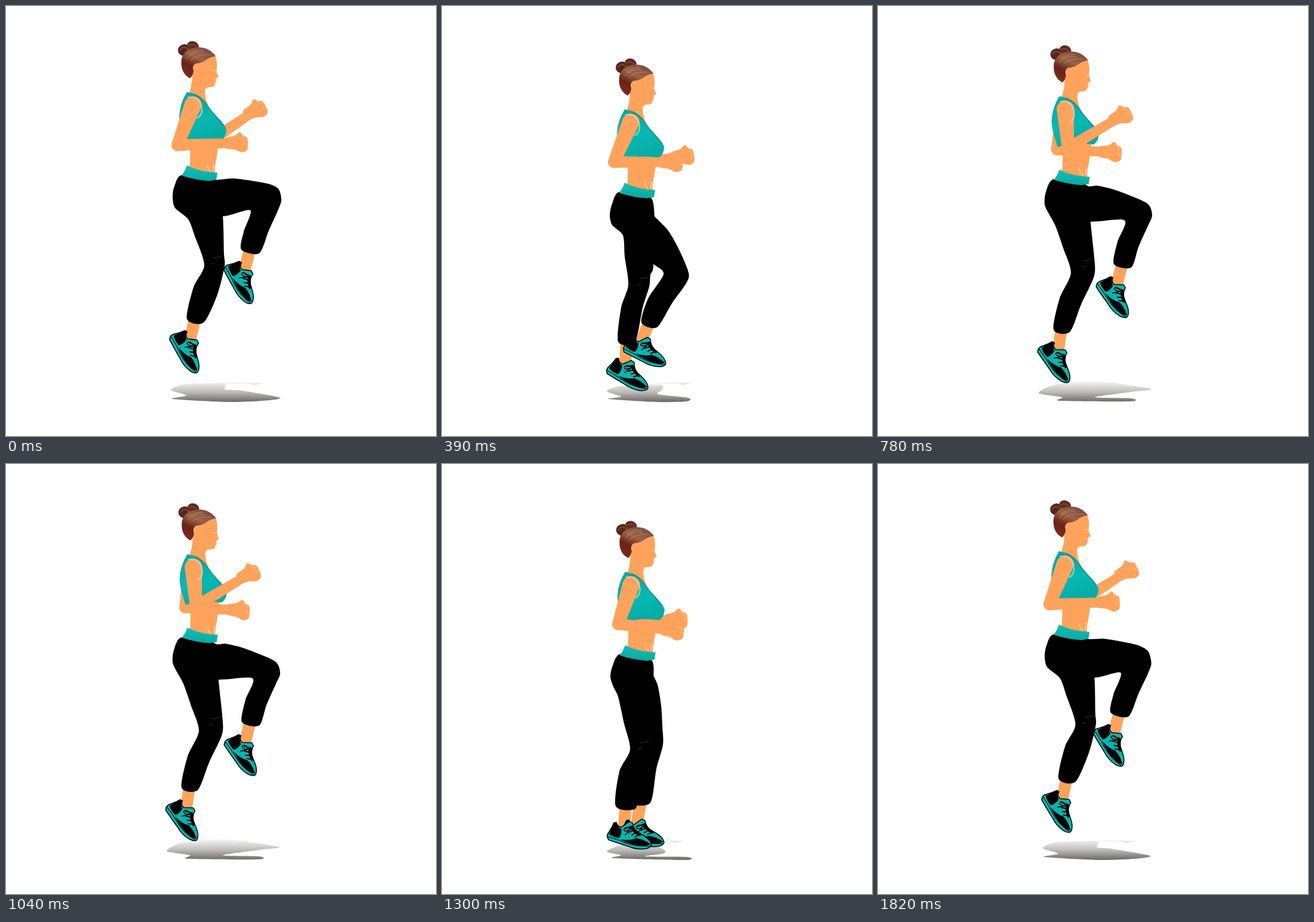
Recreate the animation shown at these times as an HTML page with a canvas. Size 720 px wide and 720 px high, loop 1950 ms.

```html
<!DOCTYPE html>
<html lang="en">
<head>
<meta charset="utf-8">
<title>High knees</title>
<style>
html, body { margin: 0; width: 100%; height: 100%; overflow: hidden; background: #fff; }
canvas { display: block; width: 100vw; height: 100vh; }
</style>
</head>
<body>
<canvas id="stage" width="720" height="720"></canvas>
<script>
const ctx = document.getElementById('stage').getContext('2d');
const SKIN = '#ffa35c', TEAL = '#06b5af', BLACK = '#000';
const STEP = 130;

// Pose: dy = body drop, near/far = elbow + hand, stand/lift = leg outlines,
// shoes = heel x, y, angle for the standing and the lifted foot.
const high = {
  dy: 0, near: [287, 233, 388, 229], far: [345, 224, 419, 174],
  stand: [295,283, 282,302, 279,320, 283,338, 305,357, 316,385, 332,434, 314,471,
    303,524, 331,530, 354,483, 366,435, 365,415, 363,352, 353,292],
  lift: [320,288, 353,291, 384,289, 436,297, 456,306, 461,325, 455,343, 440,376,
    424,414, 394,408, 398,378, 409,342, 363,352, 315,340],
  shoes: [276, 553, 55, 367, 437, 55],
  shadow: [276,643, 300,633, 365,632, 367,642, 395,644, 459,656, 430,661, 372,663, 279,658, 302,652],
  glint: 431
};
const half = {
  dy: 29, near: [288, 261, 386, 262], far: [340, 262, 405, 251],
  stand: [298,311, 285,331, 281,350, 285,367, 303,384, 306,420, 312,467, 300,505,
    295,562, 323,563, 336,505, 347,470, 349,450, 354,432, 352,324],
  lift: [322,318, 351,324, 350,345, 378,375, 398,410, 413,447, 409,464, 385,498,
    360,538, 334,530, 345,490, 371,449, 354,432, 315,400],
  shoes: [276, 610, 25, 304, 574, 21],
  shadow: [276,645, 300,636, 365,634, 369,642, 362,650, 412,656, 410,662, 360,663, 279,658, 300,654],
  glint: 418
};
const swapLow = {
  dy: 21.5, near: [310, 245, 405, 221], far: [300, 254, 391, 261],
  stand: [297,304, 283,325, 281,345, 288,362, 298,385, 308,425, 320,464, 302,500,
    292,558, 318,562, 333,515, 356,470, 358,455, 359,402, 351,316],
  lift: [322,310, 351,316, 350,328, 376,345, 400,374, 428,417, 428,433, 411,472,
    391,516, 363,510, 371,465, 390,427, 359,402, 310,370],
  shoes: [270, 601, 30, 335, 549, 42],
  shadow: [270,649, 300,634, 370,630, 427,641, 390,647, 362,655, 420,657, 418,662, 310,661, 312,655],
  glint: 405
};
const swapHigh = {
  dy: 7, near: [318, 238, 408, 184], far: [300, 240, 391, 245],
  stand: [295,290, 281,312, 279,332, 285,346, 297,368, 310,405, 323,447, 304,490,
    294,542, 321,546, 340,500, 362,452, 362,420, 356,362, 353,303],
  lift: [320,296, 353,302, 368,301, 400,309, 450,330, 459,350, 452,368, 436,404,
    424,438, 395,432, 401,395, 413,359, 356,361, 310,350],
  shoes: [269, 574, 49, 367, 465, 49],
  shadow: [269,648, 300,633, 370,629, 457,641, 425,646, 363,655, 424,657, 422,662, 305,661, 308,655],
  glint: 405
};
const low = {
  dy: 36.5, near: [295, 268, 388, 279], far: [312, 267, 394, 260],
  stand: [299,318, 285,340, 282,357, 287,373, 295,390, 305,435, 315,478, 297,515,
    291,573, 324,577, 330,540, 345,490, 350,460, 350,400, 352,330],
  lift: [322,325, 352,331, 350,345, 361,370, 367,405, 369,440, 370,470, 359,510,
    349,567, 318,567, 325,520, 330,490, 320,440, 310,400],
  shoes: [277, 624, 12, 298, 620, 12],
  shadow: [276,649, 300,638, 345,636, 372,646, 371,652, 340,657, 410,658, 408,663, 288,660, 300,655],
  glint: 404, standFront: true
};

const lerp = (a, b, k) => Array.isArray(a) ? a.map((v, i) => lerp(v, b[i], k)) : a + (b - a) * k;
function mix(a, b, k) {
  const out = {};
  for (const key in a) if (key !== 'standFront') out[key] = lerp(a[key], b[key], k);
  return out;
}

const peak = {
  ...swapHigh, dy: 0, stand: high.stand, lift: high.lift, shoes: high.shoes,
  near: lerp(swapLow.near, swapHigh.near, 1.5), far: lerp(swapLow.far, swapHigh.far, 1.5)
};
const nearTop = mix(high, half, 0.07), middle = mix(high, half, 0.5);
const steps = [high, nearTop, middle, half, low, swapLow, swapHigh, peak,
  swapHigh, swapLow, low, mix(low, half, 0.5), half, middle, nearTop];

function smooth(p, fill) {
  const n = p.length, at = i => p[(i + n) % n], t = 0.13;
  ctx.beginPath();
  ctx.moveTo(p[0], p[1]);
  for (let i = 0; i < n; i += 2) {
    ctx.bezierCurveTo(
      at(i) + (at(i + 2) - at(i - 2)) * t, at(i + 1) + (at(i + 3) - at(i - 1)) * t,
      at(i + 2) - (at(i + 4) - at(i)) * t, at(i + 3) - (at(i + 5) - at(i + 1)) * t,
      at(i + 2), at(i + 3));
  }
  ctx.closePath();
  ctx.fillStyle = fill;
  ctx.fill();
}

function disc(x, y, rx, ry, fill, turn = 0) {
  ctx.beginPath();
  ctx.ellipse(x, y, rx, ry, turn, 0, Math.PI * 2);
  ctx.fillStyle = fill;
  ctx.fill();
}

function line(d, color, width) {
  ctx.strokeStyle = color;
  ctx.lineWidth = width;
  ctx.stroke(new Path2D(d));
}

function shape(d, fill) {
  ctx.fillStyle = fill;
  ctx.fill(new Path2D(d));
}

function fade(x1, y1, x2, y2, ...colors) {
  const g = ctx.createLinearGradient(x1, y1, x2, y2);
  colors.forEach((c, i) => g.addColorStop(i / (colors.length - 1), c));
  return g;
}

function taper(x1, y1, r1, x2, y2, r2) {
  const a = Math.atan2(y2 - y1, x2 - x1) + Math.PI / 2;
  ctx.beginPath();
  ctx.arc(x1, y1, r1, a, a + Math.PI);
  ctx.arc(x2, y2, r2, a + Math.PI, a + Math.PI * 2);
  ctx.closePath();
  ctx.fillStyle = SKIN;
  ctx.fill();
}

const fist = [-21,-8, -5,-12, 4,-18, 9,-12, 16,-8, 17,5, 15,13, 6,16, -6,11, -21,8];

function arm(sx, sy, r, [ex, ey, hx, hy]) {
  const a = Math.atan2(hy - ey, hx - ex);
  taper(sx, sy, r, ex, ey, 10);
  taper(ex, ey, 10, hx - 18 * Math.cos(a), hy - 18 * Math.sin(a), 8);
  ctx.save();
  ctx.translate(hx, hy);
  ctx.rotate(a * 0.8);
  smooth(fist, SKIN);
  line('M8 -9 L14 -4 M10 0 L15 4', 'rgba(255,214,176,.55)', 1);
  ctx.restore();
}

function shoe(x, y, deg) {
  ctx.save();
  ctx.translate(x, y);
  ctx.rotate(deg * Math.PI / 180);
  ctx.scale(0.95, 0.95);
  const body = 'M0 1 C-3 -6 3 -8 6 -26 L10 -28 Q14 -20 21 -22 L32 -34 L38 -33 Q42 -21 56 -17 ' +
    'Q75 -12 79 -2 Q79 3 70 7 Q55 12 40 9 Q18 7 3 5 Z';
  shape(body, TEAL);
  line(body, BLACK, 1.6);
  shape('M2 -5 L6 -27 L11 -28 Q14 -19 21 -19 Q24 -9 21 -2 Q10 -1 2 -5 Z', BLACK);
  shape('M23 0 Q41 -1 50 -8 Q64 -9 77 -3 L70 2 Q48 7 23 0 Z', BLACK);
  line('M1 0 Q20 1 35 4 Q55 7 77 0', BLACK, 1.2);
  line('M37 -27 Q42 -18 57 -15', BLACK, 5);
  line('M38 -27 L28 -20 M43 -21 L34 -14 M48 -18 L41 -11 M54 -15 L47 -9', BLACK, 2);
  line('M36 -23 Q25 -24 26 -17 Q30 -14 37 -22 L30 -9', BLACK, 1.7);
  ctx.restore();
}

function ankle(p, [x, y, deg]) {
  const a = deg * Math.PI / 180, c = Math.cos(a), s = Math.sin(a);
  const mx = (p[0] + p[2]) / 2, my = (p[1] + p[3]) / 2;
  line(`M${mx} ${my - 6} L${x + 24 * c + 22 * s} ${y + 24 * s - 22 * c}`, SKIN, 20);
}

function shadow(pose) {
  shape(`M335 632 Q380 630 ${pose.glint} 631 L${pose.glint - 14} 635 L${pose.glint - 26} 632 Z`, '#e8e8e8');
  smooth(pose.shadow, fade(0, 630, 0, 663, '#f2f2f2', '#bdbbba', '#6c6866'));
}

function head() {
  shape('M312 112 Q312 132 306 148 L318 170 L343 174 Q333 158 333 143 Q334 136 340 136 ' +
    'Q349 136 349 132 L352 126 L351 122 L356 118 Q351 110 353 104 Q354 90 349 80 L325 78 Z', SKIN);
  disc(299, 74, 11, 10, '#54261d');
  disc(313, 67, 10, 8, '#602c20', 0.3);
  line('M291 75 Q297 64 305 73 M304 67 Q313 61 319 69 M298 81 Q306 79 306 70', '#8a4b39', 1.4);
  shape('M294 88 Q299 73 315 70 Q338 66 351 84 Q341 85 333 92 Q326 96 319 96 Q311 99 314 109 ' +
    'Q313 117 308 121 Q291 112 294 88 Z', fade(326, 70, 303, 116, '#805040', '#9c6348', '#682419', '#7c2a1b'));
  line('M303 88 Q314 75 332 78 M309 91 Q323 79 344 82 M306 82 Q317 73 330 74', 'rgba(205,150,115,.4)', 1.6);
  disc(319, 103, 5, 7, SKIN, 0.15);
  line('M346 107 L352 109 M349 126 L353 125', 'rgba(255,218,180,.65)', 1);
}

function torso() {
  shape('M306 210 L357 212 Q355 245 350 268 L349 286 L306 280 Q311 248 306 210 Z', SKIN);
  line('M336 265 Q339 274 342 277 M348 264 L347 276', 'rgba(255,218,190,.6)', 2);
  shape('M303 144 L316 147 Q330 153 337 166 Q343 175 352 184 Q367 199 369 207 Q369 219 360 225 ' +
    'Q330 220 300 229 Q290 200 290 185 Q291 163 303 144 Z',
    fade(320, 150, 342, 226, '#08aaa3', '#07b8b3', '#05aaa4'));
  line('M315 148 Q330 154 338 168 Q350 183 365 201', 'rgba(0,110,110,.5)', 1.5);
}

function draw(pose) {
  const { dy, stand, lift, shoes } = pose, dx = dy * 0.1;
  const feet = [shoes.slice(0, 3), shoes.slice(3)];
  const inBody = fn => { ctx.save(); ctx.translate(dx, dy); fn(); ctx.restore(); };
  ctx.fillStyle = '#fff';
  ctx.fillRect(0, 0, 720, 720);
  ctx.lineCap = 'butt';
  ctx.lineJoin = 'round';

  shadow(pose);
  arm(306 + dx, 172 + dy, 10, pose.far);
  inBody(() => { head(); torso(); });

  ankle(stand.slice(16, 20), feet[0]);
  if (pose.standFront) {
    ankle(lift.slice(16, 20), feet[1]);
    shoe(...feet[1]);
    shoe(...feet[0]);
  } else {
    shoe(...feet[0]);
    ankle(lift.slice(16, 20), feet[1]);
    shoe(...feet[1]);
  }
  smooth(lift, BLACK);
  smooth(stand, BLACK);
  const kx = stand[24], ky = stand[25];
  line(`M${kx - 18} ${ky + 7} L${kx - 4} ${ky + 4} M${kx - 22} ${ky + 17} l6 -1`, '#444', 0.8);

  inBody(() => shape('M303 267 Q325 278 354 279 L352 291 L340 293 Q315 291 294 284 Q300 276 303 267 Z',
    fade(0, 268, 0, 293, '#16bdb5', '#06aaa3')));

  arm(313 + dx, 166 + dy, 14.5, pose.near);
  inBody(() => {
    line('M304 153 Q326 149 328 174 Q328 183 320 188', 'rgba(255,216,190,.6)', 2.5);
  });
}

let shown = -1;
function tick(now) {
  const i = Math.floor(now / STEP) % steps.length;
  if (i !== shown) draw(steps[shown = i]);
  requestAnimationFrame(tick);
}
const start = performance.now();
draw(steps[0]);
requestAnimationFrame(function loop() {
  tick.start = start;
  const i = Math.floor((performance.now() - start) / STEP) % steps.length;
  if (i !== shown) draw(steps[shown = i]);
  requestAnimationFrame(loop);
});
</script>
</body>
</html>
```
